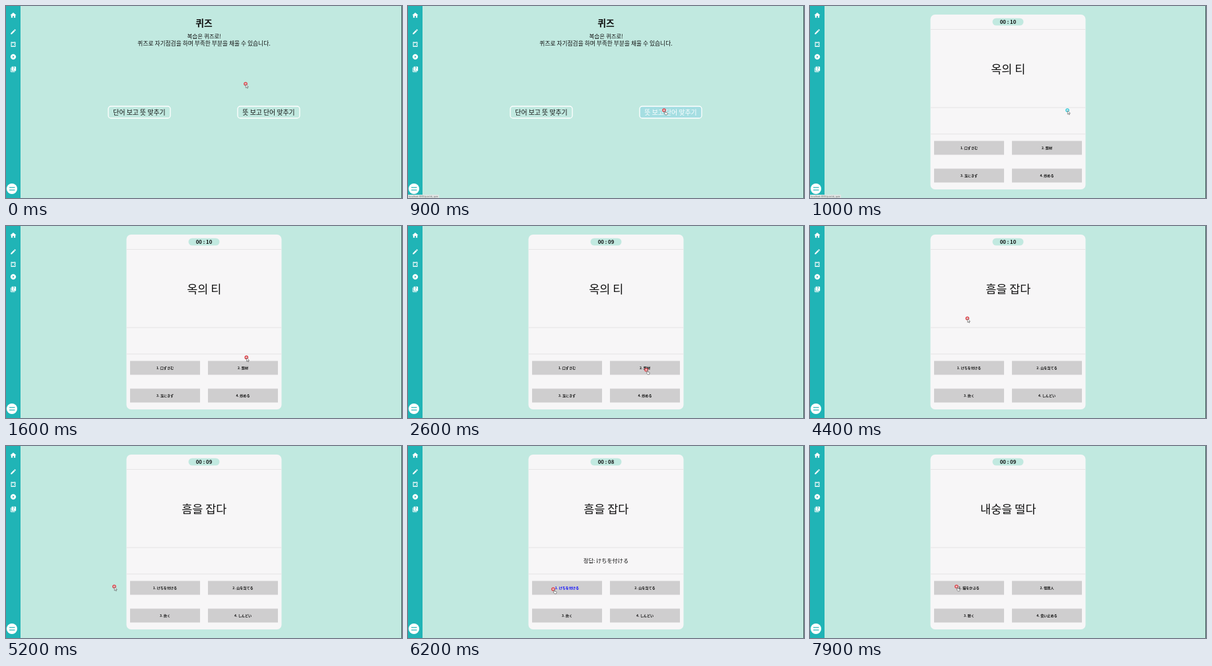
Recreate the animation shown at these times as an HTML page with a canvas. Size 600 px wide and 291 px high, loop 8000 ms.

```html
<!DOCTYPE html>
<html>
<head>
<meta charset="utf-8">
<title>퀴즈</title>
<style>
html, body { margin: 0; width: 100%; height: 100%; overflow: hidden; background: #c1e9e0; }
canvas { display: block; width: 600px; height: 291px; }
</style>
</head>
<body>
<canvas id="stage"></canvas>
<script>
const canvas = document.getElementById('stage');
const ctx = canvas.getContext('2d');
const scale = window.devicePixelRatio || 1;
canvas.width = 600 * scale;
canvas.height = 291 * scale;

const LOOP = 8000, QUIZ_START = 1000;
const MINT = '#c1e9e0', TEAL = '#20b4b6';
const FONT = '"Noto Sans CJK KR", "Noto Sans CJK JP", "Noto Sans CJK", sans-serif';

const quizzes = [
  { start: 1000, click: 2800, pick: 1, right: 2, word: '옥의 티',
    options: ['口ずさむ', '題材', '玉にきず', '炒める'] },
  { start: 3800, click: 5900, pick: 0, right: 0, word: '흠을 잡다',
    options: ['けちを付ける', '山を当てる', '炊く', 'しんどい'] },
  { start: 6900, click: 9999, pick: 0, right: 0, word: '내숭을 떨다',
    options: ['猫をかぶる', '怪我人', '聴く', '食い止める'] }
];

// time, x, y of the pointer
const path = [
  [0, 363, 118], [900, 388, 158], [1000, 390, 158], [1700, 360, 206],
  [2400, 361, 218], [2800, 361, 218], [3100, 369, 170], [3400, 350, 119],
  [3600, 334, 94], [3800, 334, 94], [4100, 322, 98], [4800, 127, 196],
  [5100, 160, 212], [5200, 164, 213], [5500, 221, 215], [6200, 220, 217],
  [7100, 220, 217], [7400, 221, 217], [7700, 221, 215], [7900, 222, 213]
];

const icons = {
  home: 'M10 20v-6h4v6h5v-8h3L12 3 2 12h3v8z',
  pencil: 'M3 17.25V21h3.75L17.81 9.94l-3.75-3.75zM20.71 7.04a1 1 0 0 0 0-1.41l-2.34-2.34a1 1 0 0 0-1.41 0l-1.83 1.83 3.75 3.75z',
  puzzle: 'M5 5h4l2 2 2-2h6v5l-2 2 2 2v6h-5l-2-2-2 2H5z',
  play: 'M12 2a10 10 0 1 0 .01 0zM10 8l6 4-6 4z',
  cards: 'M4 6H2v14a2 2 0 0 0 2 2h14v-2H4zM20 2H8a2 2 0 0 0-2 2v12a2 2 0 0 0 2 2h12a2 2 0 0 0 2-2V4a2 2 0 0 0-2-2z',
  arrow: 'M0 0V6.5L1.6 5.1 2.7 7.4 3.7 6.9 2.7 4.7H4.7z',
  hand: 'M1 0.6Q1.7 0 2.2 0.7V3L5.2 3.7Q5.8 4 5.6 5L5 7.4H2L0 4.8Q0 4.1 1 4.5z'
};
for (const name in icons) icons[name] = new Path2D(icons[name]);

function rect(x, y, w, h, color) {
  ctx.fillStyle = color;
  ctx.fillRect(x, y, w, h);
}

function box(x, y, w, h, r, fill, stroke) {
  ctx.beginPath();
  ctx.roundRect(x, y, w, h, r);
  if (fill) { ctx.fillStyle = fill; ctx.fill(); }
  if (stroke) { ctx.strokeStyle = stroke; ctx.lineWidth = 1.3; ctx.stroke(); }
}

function text(str, x, y, size, color = '#111', weight = 400) {
  ctx.font = `${weight} ${size}px ${FONT}`;
  ctx.textAlign = 'center';
  ctx.fillStyle = color;
  ctx.fillText(str, x, y + size * 0.38);
}

function icon(name, y, size = 10) {
  ctx.save();
  ctx.translate(11 - size / 2, y - size / 2);
  ctx.scale(size / 24, size / 24);
  ctx.fillStyle = ctx.strokeStyle = '#fff';
  ctx.lineWidth = 2.6;
  if (name === 'puzzle') ctx.stroke(icons[name]);
  else ctx.fill(icons[name], 'evenodd');
  ctx.restore();
}

function sidebar() {
  rect(0, 0, 22, 291, TEAL);
  icon('home', 14, 11);
  icon('pencil', 39);
  icon('puzzle', 58);
  icon('play', 77);
  icon('cards', 96);
  text('?', 11.8, 95.2, 6, TEAL, 700);
  box(1, 269, 16, 16, 8, '#fff');
  rect(5, 274.5, 8.5, 1.2, TEAL);
  rect(5, 278.3, 8.5, 1.2, TEAL);
}

function menuButton(label, x, hover) {
  box(x, 152, 94, 18, 4, hover ? '#a5dee2' : null, '#fff');
  text(label, x + 47, 161, 9.9, hover ? '#fff' : '#111');
}

function menu(p) {
  text('퀴즈', 300, 26, 13.8, '#111', 700);
  text('복습은 퀴즈로!', 300.3, 45.8, 8.5);
  text('퀴즈로 자기점검을 하며 부족한 부분을 채울 수 있습니다.', 300, 57, 8.75);
  menuButton('단어 보고 뜻 맞추기', 155, false);
  menuButton('뜻 보고 단어 맞추기', 351, overMenu(p));
}

function quiz(t) {
  const q = quizzes.findLast(item => t >= item.start);
  const answered = t >= q.click;
  const left = 10 - Math.floor((Math.min(t, q.click) - q.start + 50) / 1000);

  box(182.5, 13, 235, 265, 7, '#f7f6f7');
  for (const y of [35, 153.5, 193.5]) rect(182.5, y, 235, 1, '#e6e5e6');
  box(276.5, 18.5, 47, 11, 5.5, MINT);
  text('00 : ' + String(left).padStart(2, '0'), 300, 24.2, 7.8, '#111', 700);
  text(q.word, 300.3, 95, 17.5);
  if (answered) text('정답: ' + q.options[q.right], 300, 174, 8.2);

  q.options.forEach((label, i) => {
    const x = 188 + i % 2 * 118, y = 204.5 + (i >> 1) * 42;
    const picked = answered && i === q.pick;
    const color = !picked ? '#111' : q.pick === q.right ? '#00f' : '#f00';
    rect(x, y, 106, 21, '#cfcecf');
    text(`${i + 1}. ${label}`, x + 53, y + 10.7, 5.1, color, 700);
  });
}

function pointerAt(t) {
  const next = path.findIndex(k => k[0] > t);
  if (next < 0) return path[path.length - 1].slice(1);
  const [t0, x0, y0] = path[next - 1], [t1, x1, y1] = path[next];
  const u = (t - t0) / (t1 - t0);
  return [x0 + (x1 - x0) * u, y0 + (y1 - y0) * u];
}

const overMenu = ([x, y]) => x > 351 && x < 445 && y > 151 && y < 171;
const overOption = ([x, y]) =>
  (x > 188 && x < 294 || x > 306 && x < 412) && (y > 204 && y < 226 || y > 246 && y < 268);

function pointer(t, p) {
  const onButton = t < QUIZ_START ? overMenu(p) : overOption(p);
  const clicked = [1000, 2800, 5900].some(c => t >= c && t < c + 200);
  ctx.save();
  ctx.translate(...p);
  ctx.beginPath();
  ctx.arc(0, 0, 2.2, 0, 7);
  ctx.fillStyle = clicked ? '#d5f6f8' : '#f3c4c4';
  ctx.fill();
  ctx.strokeStyle = clicked ? '#25c4d4' : '#d8343c';
  ctx.lineWidth = 1.2;
  ctx.stroke();
  ctx.translate(0.3, 0.6);
  ctx.scale(0.85, 0.85);
  const shape = icons[onButton ? 'hand' : 'arrow'];
  ctx.fillStyle = '#fff';
  ctx.strokeStyle = '#333';
  ctx.lineWidth = 0.6;
  ctx.fill(shape);
  ctx.stroke(shape);
  ctx.restore();
}

function statusBar() {
  rect(0, 286, 47, 5, '#dfe5e4');
  text('localhost:3000/quiz/sk_quiz', 23.3, 288.6, 3.4, '#666');
}

function draw(now) {
  const t = Math.floor(now % LOOP / 100) * 100;
  const p = pointerAt(t);
  ctx.setTransform(scale, 0, 0, scale, 0, 0);
  rect(0, 0, 600, 291, MINT);
  rect(599, 0, 1, 291, '#43605d');
  sidebar();
  if (t < QUIZ_START) menu(p);
  else quiz(t);
  if (t < 1500 && (t >= QUIZ_START || overMenu(p))) statusBar();
  pointer(t, p);
}

let begin;
function loop(now) {
  begin ??= now;
  draw(Math.max(0, now - begin));
  requestAnimationFrame(loop);
}
requestAnimationFrame(loop);
</script>
</body>
</html>
```
